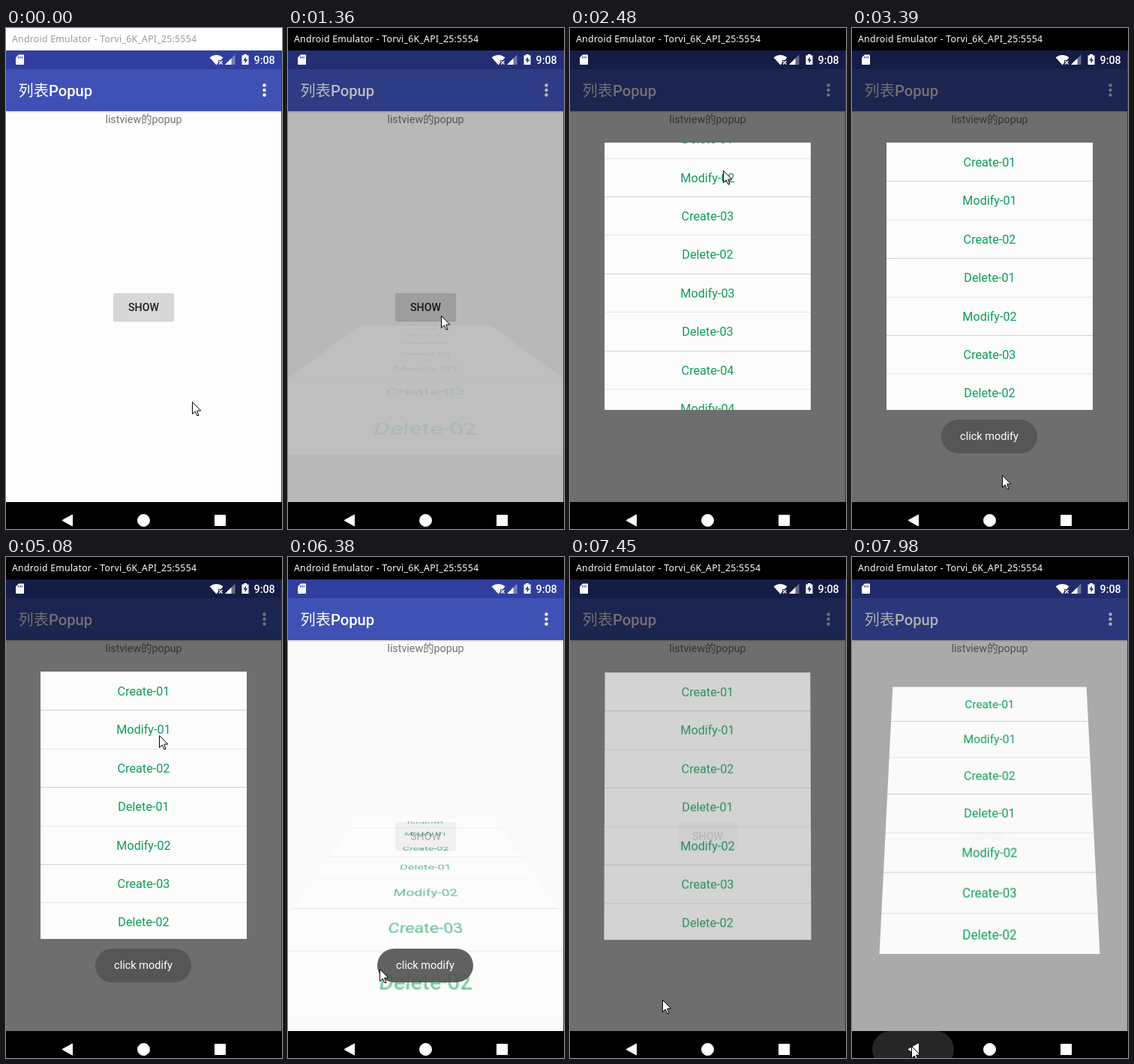
Animation of 368x669 px, one loop 8 s. Source, as an HTML page:

```html
<!DOCTYPE html>
<html lang="zh">
<head>
<meta charset="utf-8">
<title>List popup</title>
<style>
html, body { margin: 0; width: 100%; height: 100%; overflow: hidden; }
body { font-family: Roboto, "Noto Sans CJK SC", "Noto Sans CJK", sans-serif; background: #000; }
div, svg { position: absolute; }
#stage { left: 0; top: 0; width: 368px; height: 669px; overflow: hidden; }
#caption { left: 0; top: 0; width: 368px; height: 30px; padding-left: 8px; box-sizing: border-box;
  font: 12.3px/29px "Noto Sans", sans-serif; letter-spacing: .25px; white-space: nowrap; background: #fff; color: #999; }
#caption.active { background: #000; color: #fff; }
#screen { left: 0; top: 30px; width: 368px; height: 603px; overflow: hidden; background: #fdfdfd; }
.active + #screen { background: #fafafa; }
#status { width: 368px; height: 25px; background: #303f9f; }
#bar { top: 25px; width: 368px; height: 56px; background: #3f51b5; box-shadow: 0 1px 2px rgba(0,0,0,.22); }
#bar span { position: absolute; left: 16.5px; top: 0; font: 500 20.2px/58px Roboto, "Noto Sans CJK SC", "Noto Sans CJK", sans-serif;
  color: #fff; white-space: nowrap; }
#hint { top: 81px; width: 367px; text-align: center; font-size: 14.3px; line-height: 22px; color: #737373; }
#show { left: 143px; top: 324px; width: 81px; height: 37px; border-radius: 2px; background: #d6d7d7; color: #212121;
  font-size: 14.2px; font-weight: 500; line-height: 38px; text-align: center; box-shadow: 0 1px 1px rgba(0,0,0,.2); }
#show.down { box-shadow: 0 3px 3px rgba(0,0,0,.3); }
#dim { inset: 0; background: #000; }
#popup { left: 46px; top: 123px; width: 275px; height: 357px; overflow: hidden; background: #fcfcfc; }
#list { width: 275px; }
.row { width: 275px; height: 52.4px; box-sizing: border-box; border-bottom: 1px solid #d0d0d0; text-align: center;
  font-size: 16.2px; line-height: 53px; color: #0f9d58; }
.row:nth-child(even) { border-color: #e6e6e6; }
.row.down { background: #d9d9d9; }
#edge { left: 367px; top: 30px; width: 1px; height: 603px; background: #3c3c3c; }
#toast { left: 119px; top: 523px; width: 128px; height: 45px; border-radius: 23px; background: rgba(84,84,84,.92);
  color: #fff; font-size: 14.5px; line-height: 46px; text-align: center; white-space: nowrap; }
#nav { left: 0; top: 633px; width: 368px; height: 36px; overflow: hidden; background: #000; }
#ripple { left: 27px; width: 109px; height: 49px; border-radius: 25px; background: #262626; }
svg { left: 0; top: 0; }
</style>
</head>
<body>
<div id="stage">
  <div id="caption">Android Emulator - Torvi_6K_API_25:5554</div>
  <div id="screen">
    <div id="bar"><span>列表Popup</span>
      <svg width="368" height="56" fill="#fff"><circle cx="344.5" cy="21.5" r="2.2"/><circle cx="344.5" cy="28" r="2.2"/><circle cx="344.5" cy="34.5" r="2.2"/></svg>
    </div>
    <div id="status"></div>
    <div id="hint">listview的popup</div>
    <div id="show">SHOW</div>
    <div id="dim"></div>
    <div id="popup"><div id="list"></div></div>
  </div>
  <svg width="368" height="60" fill="#fff">
    <path d="M17 35.5h6q1 0 1 1V48q0 1-1 1H14q-1 0-1-1V39.5z"/>
    <path d="M16.5 38v2.5M18.9 38v2.5M21.3 38v2.5" stroke="#303f9f" stroke-width="1.2"/>
    <path d="M271.5 39.3Q280.5 32.7 289.5 39.3L286.5 43H283v3.5L280.5 49.5z"/>
    <path d="M284 44l4.5 4.5M288.5 44l-4.5 4.5" stroke="#fff" stroke-width="1.3"/>
    <path d="M305.5 35.5V49H292z" opacity=".35"/>
    <path d="M300.5 40.5V49H292z"/>
    <path d="M317 35h4v1.5h2.5V49h-9V36.5H317z"/>
    <path d="M319.8 38.5l-3.6 5h2.4v3.8l3.5-5.2h-2.3z" fill="#26337f"/>
    <text x="330.5" y="47.5" font-size="14.3" font-weight="500" font-family="Roboto, sans-serif">9:08</text>
  </svg>
  <div id="edge"></div>
  <div id="toast">click modify</div>
  <div id="nav">
    <div id="ripple"></div>
    <svg width="368" height="36" fill="#fff" stroke="#fff" stroke-linejoin="round">
      <path d="M75 24.5L88.5 17v15z"/><circle cx="183.5" cy="24.5" r="8"/><path d="M278.5 17.5h14v14h-14z"/>
    </svg>
  </div>
  <svg id="cursor" width="14" height="21"><path d="M.5 .5V16.5L4.2 13L6.7 18.5H9L6.8 12.5V12H11.8z" fill="#fff" stroke="#000"/></svg>
</div>
<script>
const LOOP = 8000, ROW = 51.4, TILT = 400, FADE = 600, DIM = .555;
const $ = id => document.getElementById(id);
const clamp = x => Math.min(1, Math.max(0, x));
const ease = x => (1 - Math.cos(Math.PI * clamp(x))) / 2;
const within = (t, a, b) => t >= a && t < b;

const items = ["Create-01", "Modify-01", "Create-02", "Delete-01", "Modify-02", "Create-03",
  "Delete-02", "Modify-03", "Delete-03", "Create-04", "Modify-04"];
const rows = items.map((label, i) => {
  const row = document.createElement("div");
  row.className = "row";
  row.style.top = i * ROW + "px";
  row.textContent = label;
  return $("list").appendChild(row);
});

// Pointer path: time, x, y
const path = [
  [30, 248, 499], [240, 231, 472], [420, 231, 472], [500, 219, 457], [720, 219, 457], [1080, 204, 384],
  [1980, 204, 384], [2420, 204, 190], [2900, 204, 190], [3360, 200, 597], [3430, 200, 597], [3620, 204, 372],
  [3650, 204, 372], [3800, 204, 163], [3900, 204, 228], [4410, 204, 228], [4680, 214, 303], [4860, 214, 303],
  [5080, 204, 238], [5200, 197, 232], [5410, 197, 232], [5800, 120, 566], [5930, 122, 550], [6480, 122, 550],
  [6800, 180, 378], [7160, 180, 378], [7420, 123, 591], [7540, 123, 591], [7800, 79, 653]
];

function pointer(t) {
  const n = path.findIndex(p => p[0] > t);
  if (n < 1) return (n ? path[path.length - 1] : path[0]).slice(1);
  const [a, b] = [path[n - 1], path[n]], k = (t - a[0]) / (b[0] - a[0]);
  return [1, 2].map(i => a[i] + (b[i] - a[i]) * k);
}

// Each popup visit: opening and closing start
const visits = [[1240, 6148], [7068, 7914]];

function drawPopup(t) {
  const visit = visits.find(([a, b]) => within(t, a, b + FADE));
  const [open, close] = visit || [0, 0];
  const leaving = t >= close;
  const age = t - (leaving ? close : open);
  const turn = leaving ? ease(age / TILT) : 1 - ease(age / TILT);
  const alpha = leaving ? 1 - ease(age / FADE) : ease(age / FADE);
  const shade = leaving ? 1 - clamp(age / 160) : clamp(age / 250);
  $("popup").style.visibility = visit && turn < .995 ? "visible" : "hidden";
  $("popup").style.opacity = alpha;
  $("popup").style.transform = turn > 0 ? `translateY(${130 * turn}px) perspective(294px) rotateX(${90 * turn}deg)` : "none";
  $("dim").style.opacity = visit ? DIM * shade : 0;
}

// Drag up with a decelerating fling, later drag back to the top
function scrollAt(t) {
  const up = clamp((t - 1980) / 750), back = clamp((t - 2920) / 400);
  return 208 * (up * (2 - up) - back);
}

function draw(t) {
  $("caption").className = t >= 1100 ? "active" : "";
  $("show").className = within(t, 1130, 1260) || within(t, 6980, 7160) ? "down" : "";
  drawPopup(t);
  $("list").style.transform = `translateY(${-scrollAt(t)}px)`;
  rows[1].classList.toggle("down", within(t, 4160, 4190));
  $("toast").style.opacity = clamp((t - 2850) / 250) * (1 - clamp((t - 6480) / 300));
  $("ripple").style.opacity = clamp((t - 7860) / 100);
  const [x, y] = pointer(t);
  $("cursor").style.transform = `translate(${Math.round(x)}px, ${Math.round(y)}px)`;
}

const start = performance.now();
function tick() {
  draw((performance.now() - start) % LOOP);
  requestAnimationFrame(tick);
}
tick();
</script>
</body>
</html>
```
